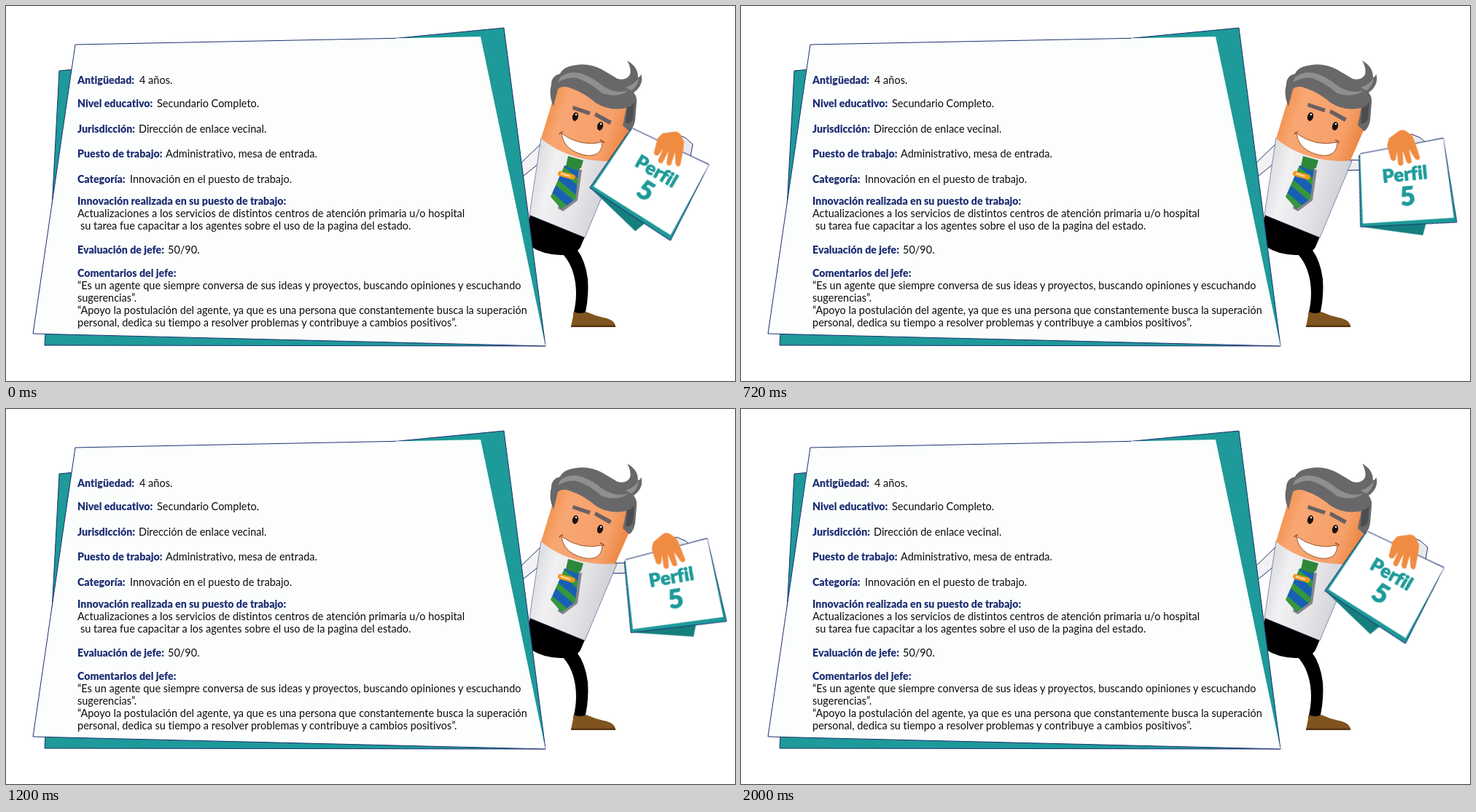
An HTML page that plays this animation: 1000 px wide and 515 px high, repeating every 2.04 s.

```html
<!DOCTYPE html>
<html lang="es">
<head>
<meta charset="utf-8">
<title>Perfil 5</title>
<style>
html, body { margin: 0; width: 100%; height: 100%; overflow: hidden; background: #fff; }
svg { display: block; width: 100vw; height: 100vh; }
text { font-family: Lato, sans-serif; font-variant-ligatures: none; }
.copy { font-size: 14.5px; fill: #0c0c0c; }
.copy .h { font-size: 14.2px; font-weight: 900; fill: #1f2f74; }
.sign text { font-weight: 900; fill: #1d9a99; stroke: #1d9a99; stroke-width: .6; text-anchor: middle; }
.line { stroke: #1d2f6f; stroke-width: 1; }
.teal { fill: #1d9a99; }

.sign, .hand {
  transform-origin: 908px 201px;
  animation: swing 2040ms -1ms steps(25) infinite;
}
.sign { --a: 25.4deg; --b: -24.6deg; }
.hand { --a: 20deg; --b: -20deg; }
.brows { animation: raise 2040ms linear infinite; }

@keyframes swing {
  0%, 98.0392%, 100% { transform: rotate(var(--a)); }
  49.0196% { transform: rotate(var(--b)); }
}
@keyframes raise {
  0%, 24% { transform: translate(0, 0); }
  38%, 100% { transform: translate(0, -5px); }
}
</style>
</head>
<body>
<svg viewBox="0 0 1000 515" preserveAspectRatio="none">
  <defs>
    <linearGradient id="skin" x1="0" y1=".3" x2="1" y2=".6">
      <stop offset="0" stop-color="#ef8a40"/>
      <stop offset=".25" stop-color="#f8a673"/>
      <stop offset=".75" stop-color="#f6a06a"/>
      <stop offset="1" stop-color="#ea8038"/>
    </linearGradient>
    <linearGradient id="shirt" x1="0" y1=".3" x2="1" y2=".6">
      <stop offset="0" stop-color="#d9d9dc"/>
      <stop offset=".25" stop-color="#f1f1f3"/>
      <stop offset=".6" stop-color="#e4e4e7"/>
      <stop offset="1" stop-color="#c9c9ce"/>
    </linearGradient>
    <pattern id="stripes" width="19" height="19" patternUnits="userSpaceOnUse" patternTransform="rotate(40)">
      <rect width="19" height="19" fill="#1760b4"/>
      <rect width="19" height="8" fill="#35963d"/>
    </pattern>
  </defs>

  <!-- man -->
  <path d="M734 189L705 217L709 234L730 217Z" fill="#f2f2f4" class="line"/>
  <path d="M818 211L861 212V225L818 226Z" fill="#eeeef1" class="line"/>
  <path d="M761 338Q777 353 781 380Q784 402 778 424L793 428Q800 402 798 375Q795 350 783 334Z"/>
  <path d="M779 420L775 441H836Q836 431 820 428Q807 425 796 420Q788 424 779 420Z" fill="#80541f"/>
  <path d="M775 438.5H836V441H775Z" fill="#573711"/>
  <path d="M719 286L794 317L788 331Q781 343 760 342Q736 341 721 331Q713 320 716 300Z"/>
  <path d="M734 181L838 213L794 318L718 287Z" fill="url(#shirt)" class="line" stroke-opacity=".5"/>
  <path d="M757 106L734 182Q755 200 785 208Q812 215 836 212L858 162Q868 132 850 122Q805 92 757 106Z" fill="url(#skin)"/>

  <path d="M751 138Q744 122 748 108Q748 96 760 93Q764 83 782 81Q800 78 817 87Q829 94 839 100Q851 103 856 94Q858 85 852 75Q867 83 867 98Q871 97 871 93Q876 108 861 119Q866 125 865 133L863 157Q861 168 855 172L846 164L851 140Q828 145 809 133Q793 119 775 113Q764 108 757 114Z" fill="#68686a"/>
  <path d="M760 98Q773 88 790 93Q806 99 816 108Q835 122 854 116Q840 127 818 120Q801 105 783 99Q770 97 757 105Z" fill="#8f8f92"/>
  <path d="M850 112Q864 107 868 98Q867 110 858 116Z" fill="#8f8f92"/>
  <path d="M852 139Q858 139 862 132L860 155Q856 163 850 161Z" fill="#4c4d50"/>

  <g class="brows" fill="#6a6061">
    <path d="M778 137L802 145L800 150L777 142Z"/>
    <path d="M809 146L831 158L828 163L807 151Z"/>
  </g>
  <g fill="#17110f">
    <ellipse cx="781" cy="152" rx="4" ry="6" transform="rotate(15 781 152)"/>
    <ellipse cx="815" cy="165" rx="4" ry="6" transform="rotate(15 815 165)"/>
  </g>
  <g fill="#fff">
    <circle cx="782" cy="149" r="1.2"/>
    <circle cx="816" cy="162" r="1.2"/>
  </g>
  <path d="M762 175Q788 194 818 187Q818 202 805 205Q793 207 778 199Q764 191 762 175Z" fill="#fff" stroke="#9b5426" stroke-width="1"/>
  <path d="M759 176Q761 173 764 173M815 184Q819 185 821 188" fill="none" stroke="#9b5426" stroke-width="1.5"/>

  <path d="M769 221L790 225L784 267L764 282L757 278Z" fill="#85868b"/>
  <path d="M766 219L786 223L781 265L762 279L747 262Z" fill="url(#stripes)"/>
  <path d="M771 206L792 212L789 222L783 226L768 220Z" fill="#2f883a"/>
  <rect x="757" y="229" width="24" height="7" rx="3" fill="#f39a22" transform="rotate(15 769 232)"/>
  <path d="M761 230L774 234" stroke="#ffe0a2" stroke-width="2"/>

  <!-- hand-held sign -->
  <path d="M920 176L932 181L942 190L938 212H905V180Z" fill="#e9e9ec" class="line"/>
  <g class="sign">
    <path d="M833 291L914 318L921 303Z" fill="#157f7e"/>
    <path d="M848 194L832 291L963 309L966 192Z" class="teal line"/>
    <path d="M850 192H966L960 302L836 287Z" fill="#fff"/>
    <path d="M850 192H966" class="line"/>
    <g transform="rotate(5 905 231)">
      <text x="905" y="240" font-size="25.5">Perfil</text>
      <text x="906" y="274" font-size="36">5</text>
    </g>
  </g>
  <path class="hand" d="M888 188L892 179L907 171Q912 169 916 172L924 180Q927 190 930 212Q927 217 923 212L917 198L918 216Q914 220 911 215L908 199L906 217Q902 221 899 216L900 199L897 209Q893 213 890 208Z" fill="#f08c42"/>

  <!-- board -->
  <path d="M73 89L683 30L740 467L53 466Z" class="teal line"/>
  <path d="M95 53L651 42L740 467L37 450Z" fill="#fbfefd"/>
  <path d="M535 44.3L95 53L37 450L740 467" fill="none" class="line"/>

  <g class="copy">
    <text class="h" x="98" y="107">Antigüedad:</text><text x="183" y="107">4 años.</text>
    <text class="h" x="98" y="139">Nivel educativo:</text><text x="207" y="139">Secundario Completo.</text>
    <text class="h" x="98" y="174">Jurisdicción:</text><text x="182" y="174">Dirección de enlace vecinal.</text>
    <text class="h" x="98" y="208">Puesto de trabajo:</text><text x="219" y="208">Administrativo, mesa de entrada.</text>
    <text class="h" x="98" y="243">Categoría:</text><text x="170" y="243">Innovación en el puesto de trabajo.</text>
    <text class="h" x="98" y="273">Innovación realizada en su puesto de trabajo:</text>
    <text x="98" y="290">Actualizaciones a los servicios de distintos centros de atención primaria u/o hospital</text>
    <text x="102" y="307">su tarea fue capacitar a los agentes sobre el uso de la pagina del estado.</text>
    <text class="h" x="98" y="340">Evaluación de jefe:</text><text x="222" y="340">50/90.</text>
    <text class="h" x="98" y="372">Comentarios del jefe:</text>
    <text x="98" y="389">“Es un agente que siempre conversa de sus ideas y proyectos, buscando opiniones y escuchando</text>
    <text x="98" y="406">sugerencias”.</text>
    <text x="98" y="423">“Apoyo la postulación del agente, ya que es una persona que constantemente busca la superación</text>
    <text x="98" y="440">personal, dedica su tiempo a resolver problemas y contribuye a cambios positivos”.</text>
  </g>
</svg>
</body>
</html>
```
